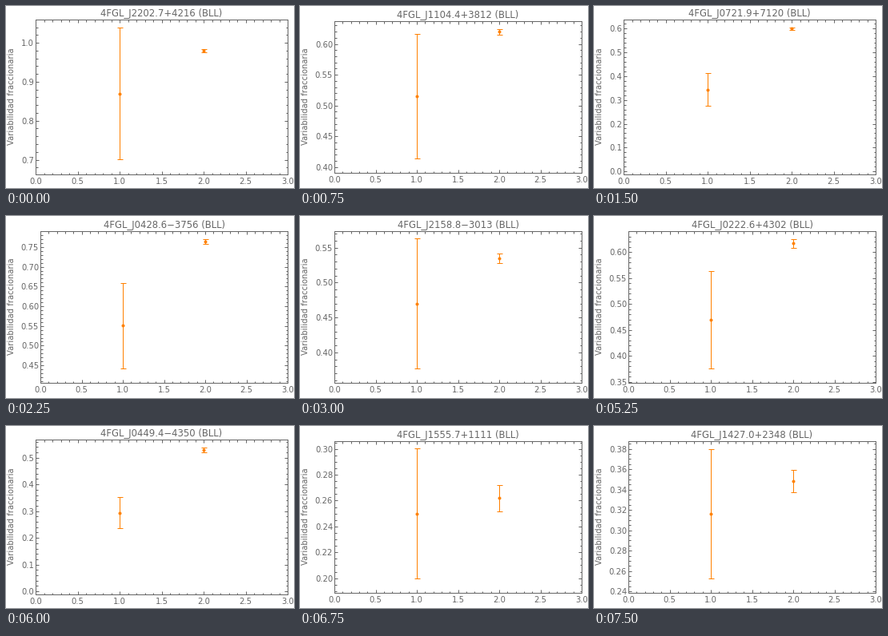
A matplotlib script for the animation above (8 s loop, 360 px wide and 228 px high).

```python
import matplotlib.pyplot as plt
from matplotlib.animation import FuncAnimation
from matplotlib.ticker import MultipleLocator

W, H, DPI = 360, 228, 72  # at 72 dpi one point is one pixel
GRAY, ORANGE = "#666666", "#ff8000"
STEP_MS, TICK_MS, LOOP_MS = 750, 250, 8000

# name and the two variability values of each object
OBJECTS = [
    ("J2202.7+4216", .87, .98),
    ("J1104.4+3812", .515, .62),
    ("J0721.9+7120", .344, .6),
    ("J0428.6−3756", .551, .765),
    ("J2158.8−3013", .47, .535),
    ("J0538.8−4405", .753, .797),
    ("J1653.8+3945", .44, .46),
    ("J0222.6+4302", .47, .617),
    ("J0449.4−4350", .294, .529),
    ("J1555.7+1111", .25, .262),
    ("J1427.0+2348", .3165, .3485),
]

plt.rcParams["font.family"] = "DejaVu Sans"
fig = plt.figure(figsize=(W / DPI, H / DPI), dpi=DPI, facecolor="white")


def y_axis(low, high):
    """Padded limits and tick step; zero is included when it lies close."""
    from_zero = low < high - low
    if from_zero:
        low = 0
    span = high - low
    step = next(s for s in (.02, .05, .1) if span < 6.7 * s or s == .1)
    above, below = .05, .02 if from_zero else .096
    unit = span / (1 - above - below)
    return (low - below * unit, high + above * unit), step


def style_axes(ax, step):
    ax.xaxis.set_major_locator(MultipleLocator(.5))
    ax.yaxis.set_major_locator(MultipleLocator(step))
    ax.minorticks_on()
    ax.xaxis.set_major_formatter("{x:.1f}")
    ax.yaxis.set_major_formatter("{x:.1f}" if step == .1 else "{x:.2f}")
    ax.tick_params(which="both", direction="in", top=True, right=True,
                   color=GRAY, labelcolor=GRAY, labelsize=10, width=1)
    ax.tick_params(which="major", length=4)
    ax.tick_params(which="minor", length=2.5)
    ax.tick_params(axis="x", pad=4)
    ax.tick_params(axis="y", pad=2)
    for spine in ax.spines.values():
        spine.set(color=GRAY, linewidth=1)


def draw(i):
    rank = i * TICK_MS // STEP_MS
    name, *values = OBJECTS[rank]
    errors = (values[0] * (.195 + .0006 * rank), .004 + .0007 * rank)
    limits, step = y_axis(min(v - e for v, e in zip(values, errors)),
                          max(v + e for v, e in zip(values, errors)))

    # longer tick labels leave a smaller frame
    left, top, right, bottom = (37, 16, 352, 210) if step == .1 else (43, 18, 352, 208)
    fig.clear()
    ax = fig.add_axes((left / W, (H - bottom - 1) / H,
                       (right - left) / W, (bottom - top) / H))
    ax.set(xlim=(0, 3), ylim=limits)
    style_axes(ax, step)
    ax.errorbar((1, 2), values, errors, fmt="o", ms=3, color=ORANGE,
                elinewidth=1, capsize=3.5, capthick=1)

    fig.text((left + right) / 2 / W, 1 - (top - 3) / H, f"4FGL_{name} (BLL)",
             color=GRAY, size=11.6, ha="center", va="baseline")
    fig.text(12 / W, 1 - (top + bottom + 1) / 2 / H, "Variabilidad fraccionaria",
             color=GRAY, size=10, rotation=90, ha="right", va="center")
    return []


anim = FuncAnimation(fig, draw, frames=LOOP_MS // TICK_MS, interval=TICK_MS,
                     init_func=lambda: [], repeat=True, repeat_delay=0)
plt.show()
```
